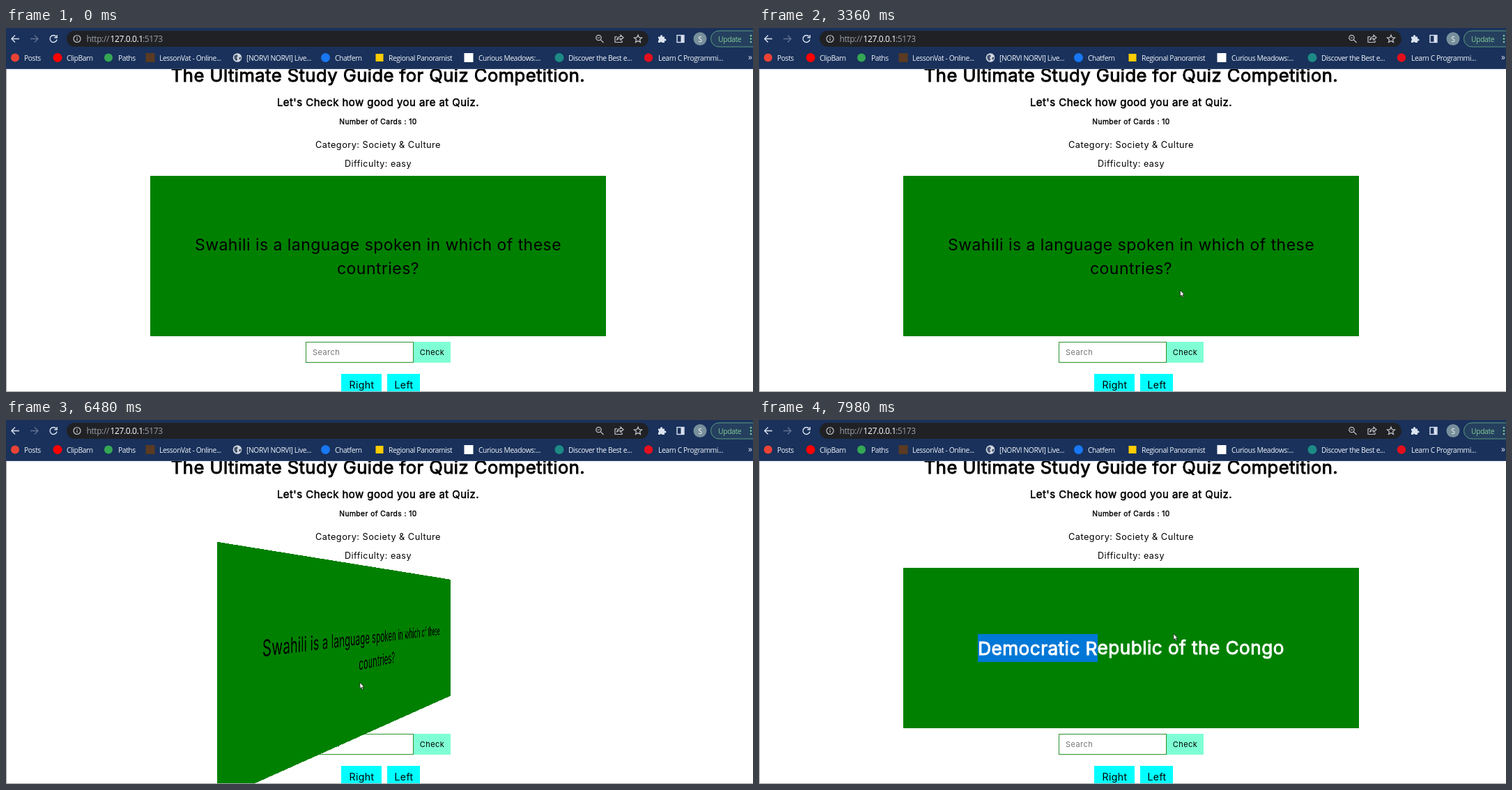
These frames come from a looping animation (1072 by 522 pixels, 8000 ms). An HTML page:

```html
<!DOCTYPE html>
<html lang="en">
<head>
<meta charset="utf-8">
<title>Quiz cards</title>
<style>
  html, body { margin: 0; width: 100%; height: 100%; overflow: hidden; background: #fff; }
  #stage { position: absolute; left: 0; top: 0; width: 1072px; height: 522px; overflow: hidden; }
  #stage svg { position: absolute; left: 0; top: 0; overflow: visible; }
  #page { position: absolute; inset: 0; clip-path: inset(59px 0 0 0); }
  #scroll { position: absolute; inset: 0; font-family: Inter, "Open Sans", sans-serif;
    font-variation-settings: "opsz" 14; letter-spacing: .028em; }
  #frame { position: absolute; left: 0; top: 59px; width: 1071px; height: 462px; border: solid #a3a5a8; border-width: 0 0 1px 1px; }
  #bar { position: absolute; left: 0; top: 0; width: 1072px; height: 59px; background: #19315b;
    font-family: "Open Sans", "Noto Sans", sans-serif; letter-spacing: -.025em; }
  .t { position: absolute; line-height: 0; white-space: pre; }
  .c { width: 1000px; margin-left: -500px; text-align: center; }
  .b { -webkit-text-stroke: .036em; }
  .box { position: absolute; box-sizing: border-box; }
  #scene { position: absolute; left: 207px; top: 212px; width: 654px; height: 230px;
    perspective: 774px; perspective-origin: 50% 61px; }
  #card { position: absolute; inset: 0; background: #008000; }
  #back { color: #fff; }
  .sel { background: #0078d7; padding: 4.5px 0; }
</style>
</head>
<body>
<div id="stage">
  <div id="page">
    <div id="scroll">
      <div class="box" style="left:430px;top:450px;width:155px;height:30px;border:1px solid #2c922c"></div>
      <div class="box" style="left:585px;top:450px;width:53px;height:30px;background:#7fffd4"></div>
      <div class="box" style="left:481px;top:496px;width:58px;height:32px;background:#0ff"></div>
      <div class="box" style="left:547px;top:496px;width:47px;height:32px;background:#0ff"></div>
      <div id="labels"></div>
      <div id="scene"><div id="card"><div id="front"></div><div id="back"></div></div></div>
    </div>
    <div id="frame"></div>
  </div>
  <div id="bar">
    <svg width="1072" height="59" fill="none" stroke="#dbe3f0" stroke-width="1.4">
      <path d="M0 58.5H1072" stroke="#3d5378" stroke-width="1"/>
      <rect x="87" y="4" width="835" height="23" rx="11.5" fill="#202124" stroke="none"/>
      <path d="M19 15.5H8.5M13 10.5L8 15.5L13 20.5"/>
      <path d="M35 15.5H45.5M41 10.5L46 15.5L41 20.5" stroke="#61718f"/>
      <path d="M72 12.4A5 5 0 1 0 73 16.5M73.2 10V13.8H69.4"/>
      <g stroke="#c4c7cc" stroke-width="1.2">
        <circle cx="102" cy="15.5" r="5"/>
        <path d="M102 14.8V18.3M102 12.5V13.7"/>
        <circle cx="850.5" cy="14" r="3.7"/>
        <path d="M853.3 16.8L857.5 21M848.8 14H852.2"/>
        <path d="M877 12.5H874V20.5H884V18M876.5 17.5Q877.5 12.5 882 12.5V10L886 13.7L882 17.3V15Q878.5 15 876.5 17.5Z"/>
        <path d="M907 10L908.6 13.7L912.5 14L909.5 16.6L910.5 20.5L907 18.4L903.5 20.5L904.5 16.6L901.5 14L905.4 13.7Z"/>
      </g>
      <path d="M936 12.5H939V11.5A1.5 1.5 0 0 1 942 11.5V12.5H945V15.5H946A1.5 1.5 0 0 1 946 18.5H945V21H941.5A1.6 1.6 0 0 0 938.5 21H936V18A1.6 1.6 0 0 0 936 15Z" fill="#dbe3f0" stroke="none"/>
      <rect x="963" y="10.5" width="10" height="10"/>
      <path d="M970.5 10V21" stroke-width="4"/>
      <circle cx="996" cy="15.5" r="9.5" fill="#78909c" stroke="none"/>
      <rect x="1011.5" y="4" width="74" height="23" rx="11.5" fill="#25405f" stroke="#5c9b80" stroke-width="1"/>
      <g fill="#81c995" stroke="none">
        <circle cx="1069" cy="11" r="1.3"/><circle cx="1069" cy="15.5" r="1.3"/><circle cx="1069" cy="20" r="1.3"/>
      </g>
      <g stroke="none">
        <circle cx="13" cy="42.5" r="6" fill="#ea4335"/>
        <circle cx="74" cy="42.5" r="6.5" fill="#f00"/>
        <circle cx="147" cy="42.5" r="6" fill="#34a853"/>
        <rect x="200.5" y="36" width="13" height="13" fill="#5a3a22"/>
        <circle cx="332" cy="42.5" r="6.3" fill="#d5dae2"/>
        <path d="M327.5 40L331 38L333 40L331 42.5L332.5 45L330.5 47.5L327.5 44ZM334.5 42L337.5 41.5L336.5 45.5L334.5 45Z" fill="#43536f"/>
        <circle cx="458.5" cy="42.5" r="6.5" fill="#1877f2"/>
        <rect x="530.5" y="37" width="11" height="11" fill="#fc0"/>
        <rect x="657.5" y="36" width="13" height="13" fill="#fff"/>
        <circle cx="794" cy="42.5" r="6.5" fill="#1d8a86"/>
        <circle cx="922" cy="42.5" r="6.2" fill="#e3101c"/>
      </g>
    </svg>
  </div>
  <svg width="1072" height="522" fill="#fff" stroke="#111" stroke-width=".7" stroke-linejoin="round">
    <g id="arrow"><path d="M.4.4V9.2L2.4 7.4L3.7 10.6L5.2 10L3.9 6.9H6.5Z"/></g>
    <g id="beam"><path d="M-2 -4.3H2M0 -4.3V4.3M-2 4.3H2" fill="none"/></g>
    <g id="hand"><path d="M2.5 7V1.2A.9.9 0 0 1 4.3 1.2V4.5L8 5.3Q9 5.6 9 6.8L8.3 10V12.5H3.7V11L.6 7.6Q.8 6.2 2.5 7.6Z"/></g>
  </svg>
</div>
<script>
const LOOP = 8000, FLIP_START = 6308, FLIP_LENGTH = 760;
const $ = id => document.getElementById(id);

function text(parent, str, x, y, size, cls = '', color = '') {
  const el = document.createElement('div');
  el.className = 't ' + cls;
  el.textContent = str;
  el.style.cssText = `left:${x}px;top:${y}px;font-size:${size}px;color:${color}`;
  parent.append(el);
  return el;
}

const labels = $('labels'), bar = $('bar');
text(labels, 'The Ultimate Study Guide for Quiz Competition.', 534, 67.5, 25.6, 'c b');
text(labels, "Let's Check how good you are at Quiz.", 534, 106.5, 14.98, 'c b');
text(labels, 'Number of Cards : 10', 534, 134, 10.25, 'c b');
text(labels, 'Category: Society & Culture', 534, 167.5, 12.8, 'c');
text(labels, 'Difficulty: easy', 534, 195, 12.6, 'c');
text(labels, 'Search', 440, 465, 11, '', '#757575');
text(labels, 'Check', 611.5, 465, 11, 'c');
text(labels, 'Right', 510.5, 512, 14, 'c');
text(labels, 'Left', 571, 512, 14, 'c');

text($('front'), 'Swahili is a language spoken in which of these', 327, 98.5, 23.04, 'c');
text($('front'), 'countries?', 327, 133, 23.04, 'c');
const answer = text($('back'), '', 327, 115, 26.2, 'c b');
const picked = document.createElement('span');
picked.textContent = 'Democratic R';
answer.append(picked, 'epublic of the Congo');

text(bar, 'http://', 115.5, 15.5, 12, '', '#9aa0a6');
text(bar, '127.0.0.1', 149.5, 15.5, 12, '', '#fff');
text(bar, ':5173', 196, 15.5, 12, '', '#9aa0a6');
text(bar, 'S', 996, 15.5, 10, 'c', '#fff');
text(bar, 'Update', 1022, 15.5, 10.4, '', '#81c995');
text(bar, '»', 1065, 42, 12, '', '#e8edf5');
const marks = [
  [26, 'Posts'], [87, 'ClipBarn'], [161, 'Paths'], [220, 'LessonVat - Online...'],
  [345, '[NORVI NORVI] Live...'], [472, 'Chatfern'], [549, 'Regional Panoramist'],
  [678, 'Curious Meadows:...'], [807, 'Discover the Best e...'], [936, 'Learn C Programmi...']
];
for (const [x, name] of marks) text(bar, name, x, 42.5, 10.3, '', '#f1f4f9');

// Pointer stops: time, x, y, shape
const stops = [
  [250, 622, 378, 'arrow'], [370, 604, 375.5, 'arrow'], [3920, 589, 410.5, 'arrow'],
  [4070, 582, 436, 'arrow'], [4190, 578.5, 464.5, 'beam'], [4460, 587, 464, 'hand'],
  [4610, 572, 492.5, 'arrow'], [4760, 526, 507, 'hand'], [4930, 560.5, 508, 'hand'],
  [5070, 571.5, 509, 'hand'], [5220, 572.5, 509, 'hand'], [5530, 553, 478, 'arrow'],
  [5670, 507.5, 377, 'arrow'], [5820, 507.5, 376, 'arrow'], [6990, 450, 365, 'arrow'],
  [7110, 380, 348, 'arrow'], [7230, 332, 332, 'beam'], [7350, 313, 324.5, 'beam'],
  [7470, 314, 324.5, 'beam'], [7590, 313, 324.5, 'beam'], [7860, 485, 325, 'beam'],
  [7980, 594.5, 306, 'arrow']
];
const flipTimes = [6360, 6480, 6630, 6750, 6870, 6990, 7110];

// cubic-bezier(.25, .1, .25, 1)
function ease(x) {
  const curve = (a, b, u) => 3 * a * u * (1 - u) ** 2 + 3 * b * u * u * (1 - u) + u ** 3;
  let lo = 0, hi = 1;
  for (let i = 0; i < 24; i++) {
    const mid = (lo + hi) / 2;
    if (curve(.25, .25, mid) < x) lo = mid; else hi = mid;
  }
  return curve(.1, 1, lo);
}

function drawPointer(t) {
  const stop = stops.filter(s => s[0] <= t).pop();
  for (const id of ['arrow', 'beam', 'hand']) {
    const on = stop && stop[3] === id;
    $(id).style.display = on ? '' : 'none';
    if (on) $(id).setAttribute('transform', `translate(${stop[1]} ${stop[2]})`);
  }
}

function drawCard(t) {
  const step = flipTimes.filter(s => s <= t).pop();
  const angle = step ? 180 * ease(Math.min(1, (step - FLIP_START) / FLIP_LENGTH)) : 0;
  const flipped = angle > 90;
  const turn = flipped ? angle - 180 : angle;
  $('card').style.transform = Math.abs(turn) < .01 ? 'none' : `rotateY(${turn}deg)`;
  $('front').style.display = flipped ? 'none' : '';
  $('back').style.display = flipped ? '' : 'none';
  picked.className = t >= 7860 ? 'sel' : '';
}

function draw() {
  const t = performance.now() % LOOP;
  const atTop = t >= 2370 && t < 3360;
  $('scroll').style.top = atTop ? '33.6px' : '0';
  drawCard(t);
  drawPointer(t);
  requestAnimationFrame(draw);
}
draw();
</script>
</body>
</html>
```
